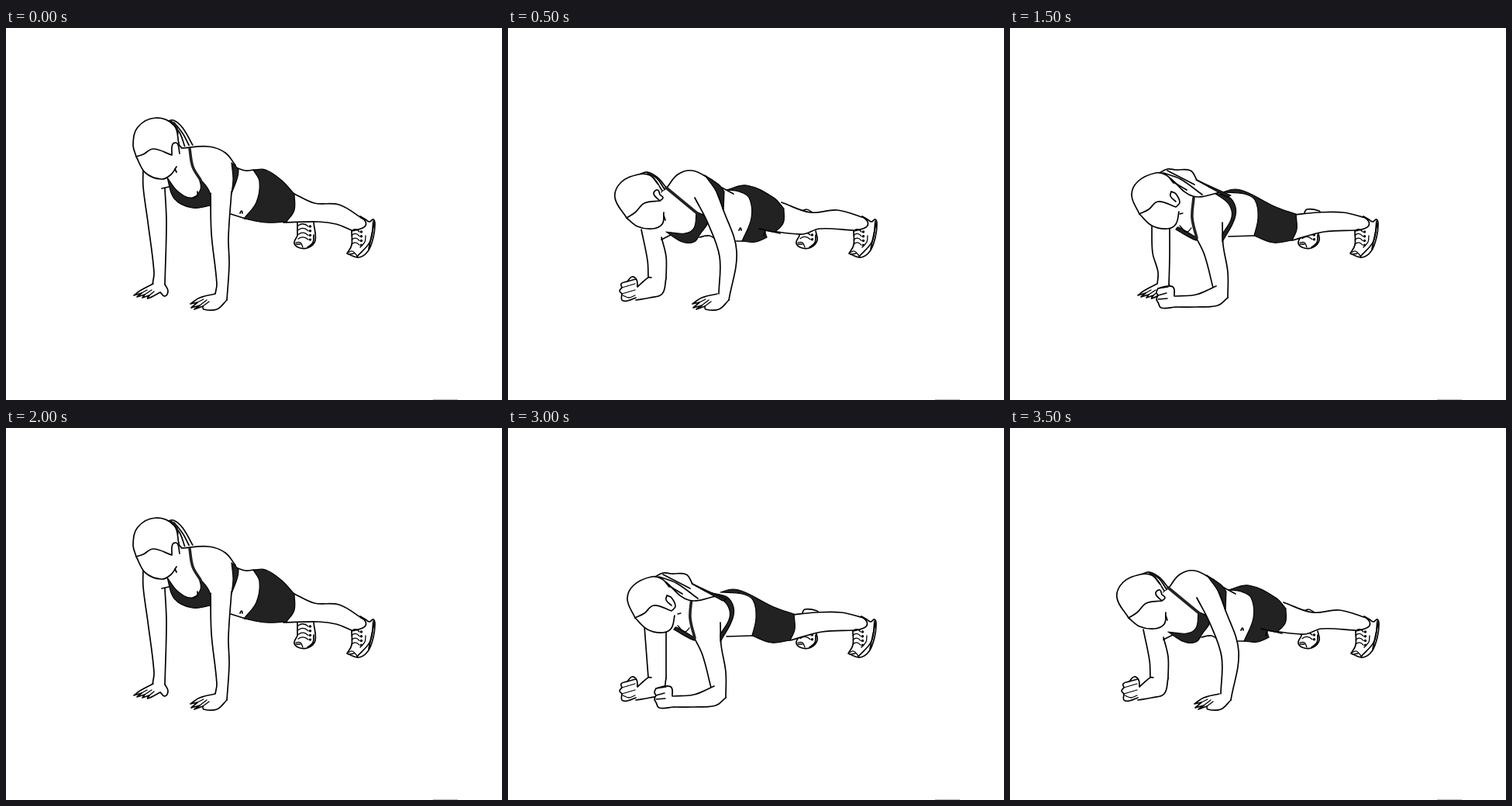
Animation of 640x480 px, one loop 4 s. Source, as an HTML page:

```html
<!DOCTYPE html>
<html lang="en">
<head>
<meta charset="utf-8">
<title>Plank up-down</title>
<style>
html, body { margin: 0; width: 100%; height: 100%; overflow: hidden; background: #fff; }
svg { display: block; width: 640px; height: 480px; }
path { stroke: #000; stroke-width: 1.7; stroke-linecap: round; stroke-linejoin: round; fill: none; }
.shape { fill: #fff; }
.skin { fill: #fff; stroke: none; }
.dark { fill: #222; stroke-width: 1.2; }
.strap { stroke: #222; stroke-width: 3.6; }
.thin { stroke-width: 1.3; }
</style>
</head>
<body>
<svg id="stage" viewBox="0 0 640 480"></svg>
<script>
const points = text => text.trim().split(/\s+/)
  .map(Number)
  .reduce((list, n, i) => (i % 2 ? list[list.length - 1].push(n) : list.push([n]), list), []);

// Control point on the tangent from a to b, scaled to the span length
function handle(p, a, b, span) {
  const k = span * 0.36 / (Math.hypot(b[0] - a[0], b[1] - a[1]) || 1);
  return [p[0] + (b[0] - a[0]) * k, p[1] + (b[1] - a[1]) * k];
}

function smooth(pts) {
  return pts.slice(1).map((q, i) => {
    const p = pts[i], span = Math.hypot(q[0] - p[0], q[1] - p[1]);
    return 'C' + [
      handle(p, pts[i - 1] || p, q, span),
      handle(q, pts[i + 2] || q, p, span),
      q
    ].join(' ');
  }).join('');
}

// A bar marks a corner between smooth runs
function trace(text) {
  let last, d = '';
  for (const part of text.split('|')) {
    const pts = points(part);
    if (last) pts.unshift(last);
    else d = 'M' + pts[0];
    d += smooth(pts);
    last = pts[pts.length - 1];
  }
  return d;
}

const path = (cls, d) => `<path class="${cls}" d="${d}"/>`;
const pen = cls => text => text.split(';').map(t => path(cls, trace(t))).join('');
const shape = pen('shape'), skin = pen('skin'), dark = pen('dark');
const line = pen('line'), strap = pen('strap'), thin = pen('thin');
const flip = text => points(text).reverse().flat().join(' ');
const limb = (a, b) =>
  path('skin', trace(a) + trace(flip(b)).replace('M', 'L')) + line(a) + line(b);
const move = (x, y, art) => `<g transform="translate(${x} ${y})">${art}</g>`;

function laces(x, y, count, width) {
  let art = '';
  for (let i = 0; i < count; i++, y += 5.7) {
    art += path('thin', `M${x} ${y}q${width / 2} -5 ${width} 1`) +
      `<circle cx="${x + width + 2.5}" cy="${y + 1}" r="1.7"/>`;
  }
  return art;
}

// Feet
const nearShoe =
  shape('457 243 464 247 | 469 250 474 247 476 253 474 270 467 288 455 296 440 291 | 446 280 446 262 | 462 257 464 250 457 243') +
  line('474 249 470 275 453 295;475 252 468 285') +
  thin('441 290 447 288 453 294;442 292 449 291;457 283 463 276 464 268') +
  laces(446, 262, 4, 10);
const farShoe = (top, count) =>
  shape(`376 ${top} 376 268 | 372 278 380 284 391 283 399 274 397 ${top}`) +
  line('397 267 396 277 389 283') +
  thin('374 277 380 277 383 283;374 279 380 279') +
  laces(377, top + 4, count, 13);

// Hands
const farPalm =
  shape('190 330 173 339 165 345 | 175 342 | 169 347 | 179 344 | 176 348 | 185 345 | 183 349 199 341 | 205 346 209 339 205 331') +
  thin('175 342 182 338;179 344 188 338;185 345 191 340');
const nearPalm =
  shape('270 343 250 348 238 356 | 247 354 | 239 361 | 250 358 | 243 363 | 254 359 | 255 363 272 363 285 351') +
  thin('247 354 255 350;250 358 259 351;254 359 262 353');
const farFist =
  shape('167 334 166 325 160 321 154 327 | 146 330 147 335 | 144 339 147 343 | 147 351 154 352 165 348') +
  thin('154 327 165 324;147 335 164 330;147 343 164 338;148 345 156 348 164 345');
const nearFist =
  shape('212 346 211 335 203 333 191 336 | 189 341 191 345 | 189 350 191 354 | 195 361 214 360') +
  thin('191 336 204 334;191 345 202 342;191 350 203 349');

// Bent arms
const foreArm = limb('185 322 181 322 167 334', '204 323 199 343 183 348 165 351') + farFist;
const elbowArm =
  limb('240 270 251 293 262 335', '274 251 275 280 281 315 281 348') +
  limb('266 333 240 344 213 346', '281 348 268 358 240 360 213 360') + nearFist;

// Straight arms
const highLegs = farShoe(251, 4) +
  limb('372 214 398 226 430 228 460 246', '358 251 403 250 426 253 446 261') + nearShoe;
const highHair =
  shape('207 121 216 119 228 129 243 155 | 226 154 220 137') +
  line('212 121 224 135 231 154;217 122 228 136 237 153') +
  strap('213 121 219 127 221 136');
const highTorso =
  skin('176 180 | 223 155 262 152 283 161 298 180 | 319 183 | 309 246 | 265 234 | 205 208') +
  line('226 155 262 153 283 161 296 177;299 181 309 184 320 183;290 240 309 246;302 239 304 236 305 239') +
  dark('319 183 335 183 355 196 372 214 | 372 235 362 250 | 335 251 307 246 | 323 225 327 198 319 183');
const highArms =
  limb('177 181 177 205 183 250 191 315 189 331', '205 207 207 250 205 331') + farPalm +
  line('201 207 210 205') +
  dark('208 193 | 217 220 240 232 265 229 | 262 210 249 193 | 251 208 240 219 222 211 208 193') +
  strap('237 156 241 179 251 196') + line('247 211 247 216 242 219') +
  limb('264 213 265 265 272 330 270 343', '291 211 287 270 288 305 285 351') + nearPalm +
  dark('291 174 300 184 291 214 | 293 195 291 174');
const highHead =
  shape('223 149 217 126 193 116 170 128 164 150 168 166 | 180 187 201 195 213 189 220 179') +
  line('168 166 177 163 190 156 214 164 | 215 150 221 149 224 162;218 182 220 186');
const highPose = highLegs + highHair + highTorso + highArms + highHead;

// Far elbow down
const tiltLegs = farShoe(262, 2) + shape('378 237 385 234 393 238') +
  limb('353 225 390 238 425 235 460 245', '333 261 380 266 402 259 446 261') + nearShoe;
const tiltTorso =
  shape('169 189 180 186 193 193 205 207 | 198 212') +
  line('174 188 187 193 199 210;180 187 192 194 202 208') +
  skin('198 212 | 206 206 220 189 238 184 262 195 | 280 211 | 311 215 | 315 240 | 302 275 | 225 272 | 173 262') +
  line('205 206 219 189 238 184 263 196;276 206 291 214;294 275 303 275;247 270 260 268 271 275;298 261 300 258 301 261') +
  dark('282 209 308 203 343 219 356 233 | 355 252 340 267 | 320 276 302 275 | 314 245 311 219 298 211 282 209') +
  skin('332 262 | 350 265 | 335 271') + line('324 259 351 265;332 262 330 268');
const tiltArms =
  limb('172 260 180 300 181 322', '198 270 204 295 204 323') + foreArm +
  line('198 273 210 267') +
  dark('204 263 228 265 240 258 243 237 | 258 247 248 266 | 240 276 225 276 204 263') +
  strap('204 206 244 239') +
  limb('241 219 258 252 273 295 272 343', '263 196 278 235 295 288 285 351') + nearPalm +
  dark('254 190 273 203 279 211 | 278 236 | 270 213 254 190');
const tiltHead =
  shape('194 202 183 190 168 189 146 199 138 219 153 245 | 167 256 186 259 199 253 201 238') +
  line('153 245 164 238 176 226 196 223 | 188 214 193 209 196 215 | 200 219 196 223;201 242 203 248');
const tiltPose = tiltLegs + tiltTorso + tiltArms + tiltHead;

// Near elbow down
const lowBody = farShoe(262, 2) + shape('379 241 383 234 399 236 401 240') +
  limb('366 241 397 238 430 238 459 245', '364 274 405 263 446 261') + move(-1, 0, nearShoe) +
  skin('190 250 | 240 212 | 284 212 | 316 222 | 315 268 | 283 269 | 240 272') +
  dark('274 212 290 208 306 212 343 231 369 240 | 370 260 364 274 | 340 277 315 268 | 320 245 316 222 302 214 274 212') +
  line('282 269 315 268');
const lowFront =
  dark('214 260 217 257 240 270 | 240 274 214 260') +
  thin('219 255 228 263 234 258;219 240 223 239') + elbowArm +
  strap('237 219 235 245 241 271') +
  dark('264 213 285 220 291 242 274 276 | 274 266 | 286 244 282 227 264 213');
const lowHead =
  shape('191 188 203 182 214 183 233 184 241 196 | 272 212 | 236 217 207 194') +
  line('198 187 220 195 248 215;196 190 228 209;203 184 238 202') +
  dark('240 196 285 216 | 280 218 | 240 196') +
  shape('211 200 202 190 188 187 165 198 157 216 167 240 | 183 255 203 259 214 253 218 237') +
  line('167 240 179 234 191 224 214 231 | 219 225 214 214 208 211 | 207 217 214 224');
const nearDownPose = lowBody +
  limb('183 256 184 290 191 315 190 331', '206 259 206 295 205 332') + farPalm +
  lowFront + lowHead;

const bothDownPose = lowBody +
  limb('176 256 181 322', '204 262 204 323') + foreArm +
  lowFront + move(-3, 5, lowHead);

const poses = [highPose, tiltPose, bothDownPose, nearDownPose];
const order = [0, 1, 2, 3, 0, 3, 2, 1];
const hold = 500;

const stage = document.getElementById('stage');
stage.innerHTML = poses.map(art => `<g>${art}</g>`).join('') +
  '<rect x="551" y="479" width="32" height="1" fill="#bbb"/>';
const groups = [...stage.children].slice(0, poses.length);

function draw(ms) {
  const now = order[Math.floor(ms / hold) % order.length];
  groups.forEach((g, i) => { g.style.display = i === now ? '' : 'none'; });
}

const start = performance.now();
function tick() {
  draw(performance.now() - start);
  requestAnimationFrame(tick);
}
draw(0);
requestAnimationFrame(tick);
</script>
</body>
</html>
```
